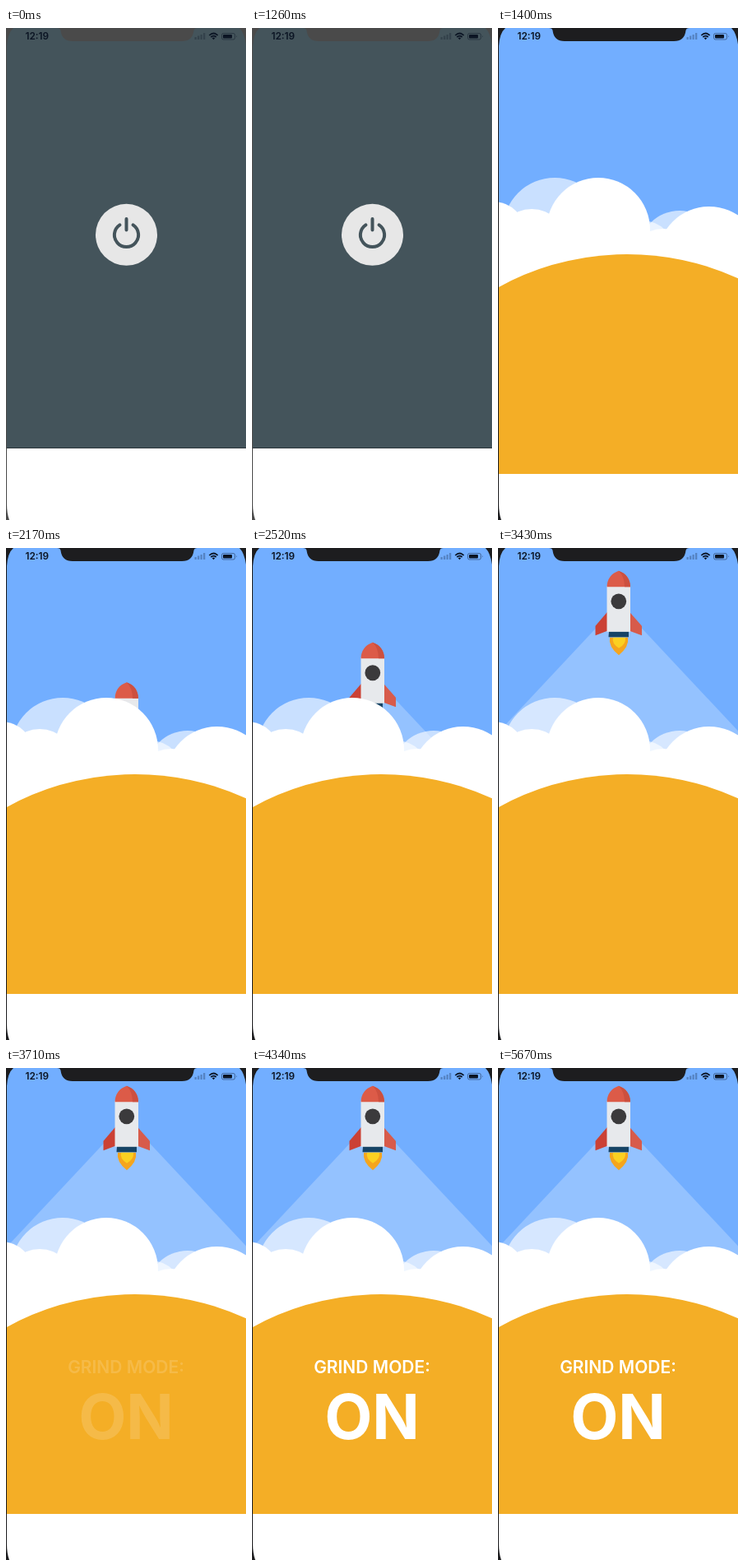
Write an HTML page that moves like this. It is 292 by 598 pixels and loops after 5740 ms.

```html
<!DOCTYPE html>
<html lang="en">
<head>
<meta charset="utf-8">
<title>Launch</title>
<style>
  html, body { margin: 0; width: 100%; height: 100%; overflow: hidden; background: #fff; }
  svg { display: block; width: 292px; height: 598px; }
  text { font-family: Inter, "Liberation Sans", sans-serif; font-weight: 600; }
</style>
</head>
<body>
<svg viewBox="0 0 292 598">
  <rect width="292" height="598" fill="#fff"/>

  <g id="sky">
    <rect width="292" height="300" fill="#72aeff"/>
    <g id="rocket">
      <path d="M147 40L377 285H-83Z" fill="#fff" opacity=".24"/>
      <path d="M136 81H158Q160 92 147 102.500Q134 92 136 81Z" fill="#f5a51d"/>
      <path d="M140 81H155Q156 89 147 94Q138 88 140 81Z" fill="#fbd021"/>
      <path d="M135 73H159V80.500H134.500Z" fill="#164466"/>
      <path d="M133 50L118.500 67V78.500L133 73Z" fill="#cb4135"/>
      <path d="M160 50L175 67V78.500L160 73Z" fill="#d75b4b"/>
      <rect x="132.500" y="18" width="28.500" height="56" fill="#e7e9ec"/>
      <path d="M132.500 19.500Q133 5 146.800 0Q160.500 5 161 19.500Z" fill="#dc5b48"/>
      <path d="M146.800 0Q160.500 5 161 19.500H154Q154 7 146.800 0Z" fill="#cc503f"/>
      <circle cx="146.800" cy="37" r="9.400" fill="#3b3a3c"/>
    </g>
    <g fill="#fff">
      <g opacity=".62">
        <circle cx="69" cy="245" r="63"/>
        <circle cx="221" cy="272" r="50"/>
      </g>
      <circle cx="175" cy="275" r="41" opacity=".62"/>
      <circle cx="-6" cy="251" r="40"/>
      <circle cx="41" cy="263" r="43"/>
      <circle cx="122" cy="245" r="63"/>
      <circle cx="201" cy="287" r="43"/>
      <circle cx="257" cy="280" r="63"/>
      <rect y="247" width="292" height="351"/>
    </g>
    <path d="M-8 542V320A325 325 0 0 1 300 308V542Z" fill="#f4ae26"/>
    <g id="label" fill="#fff" text-anchor="middle">
      <text x="146" y="370.500" font-size="21">GRIND MODE:</text>
      <text x="146" y="450.500" font-size="75.500" style="font-weight:700">ON</text>
    </g>
  </g>

  <g id="power">
    <rect width="292" height="510.500" fill="#44545b"/>
    <path d="M0 510.500H292" stroke="#2c363b"/>
    <circle cx="146.500" cy="251.300" r="37.500" fill="#e7e7e7"/>
    <path d="M138.400 239.300A14.600 14.600 0 1 0 154.600 239.300M146.500 232V245.500" fill="none" stroke="#44545b" stroke-width="4" stroke-linecap="round"/>
  </g>

  <g id="bezel">
    <path d="M62 0Q66 0 66.500 3Q68 16 81 16H214Q227 16 228.500 3Q229 0 233 0Z"/>
    <path d="M0 0H9Q2 6 1 22V578Q1 590 4 598H0ZM292 0H284Q290 6 292 20Z"/>
  </g>
  <g id="status" fill="#0c1524">
    <text x="23.500" y="14.300" font-size="11.800">12:19</text>
    <path d="M229.500 11h2.300v3h-2.300zM233 9.500h2.300v4.500h-2.300zM236.500 8h2.300v6h-2.300zM240 6h2.300v8h-2.300z" opacity=".28"/>
    <path d="M247.300 9Q252.500 4 257.700 9M249.300 11Q252.500 8.200 255.700 11" fill="none" stroke="#0c1524" stroke-width="1.700"/>
    <path d="M250.700 12.300Q252.500 10.800 254.300 12.300L252.500 14.200Z"/>
    <rect x="262.500" y="6.500" width="16" height="7.500" rx="2" fill="none" stroke="#0c1524" stroke-opacity=".45"/>
    <rect x="264" y="8" width="11" height="4.500" rx="1"/>
    <path d="M280 9Q281.500 10.200 280 11.500Z" opacity=".5"/>
  </g>
</svg>
<script>
  const LOOP = 5740, STEP = 70, LAUNCH = 1400, ARRIVE = 3.7;
  const [power, sky, rocket, label, bezel] =
    ["power", "sky", "rocket", "label", "bezel"].map(id => document.getElementById(id));
  const clamp = v => Math.min(1, Math.max(0, v));
  const show = (el, on) => el.setAttribute("visibility", on ? "visible" : "hidden");

  function draw() {
    const now = performance.now() % LOOP;
    const t = now - now % STEP;
    const flying = t >= LAUNCH;
    show(power, !flying);
    show(sky, flying);
    bezel.setAttribute("fill", flying ? "#1d1d1f" : "#4a4a4a");

    // The rocket slows down as it nears its resting height.
    const left = Math.max(0, ARRIVE - t / 1000);
    const drop = left * left * (88 - 18 * left);
    rocket.setAttribute("transform", `translate(0 ${21.8 + drop})`);
    label.setAttribute("opacity", clamp((t - 3600) / 700));
    requestAnimationFrame(draw);
  }
  draw();
</script>
</body>
</html>
```
